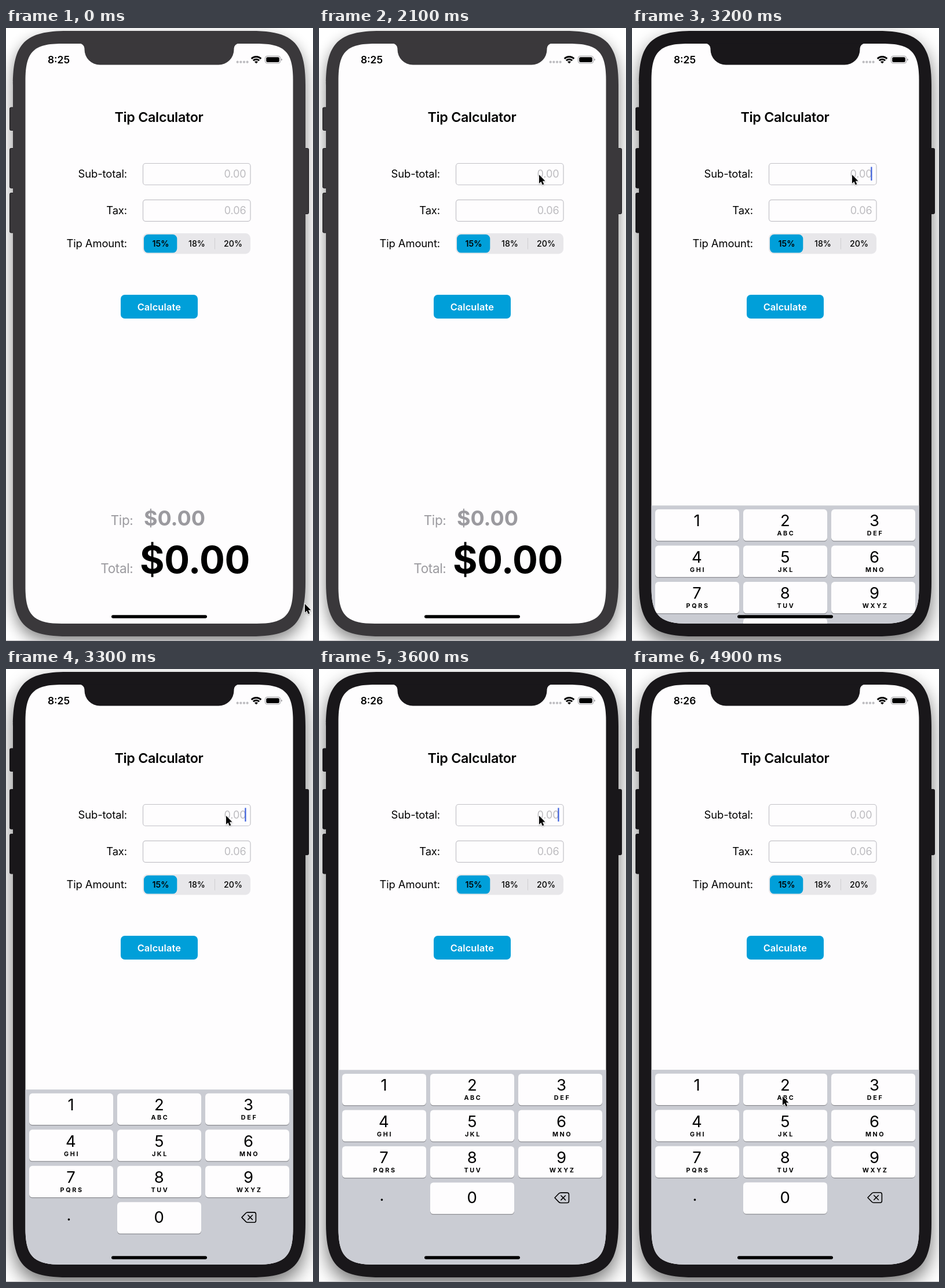
Recreate the animation shown at these times as an HTML page. Size 530 by 1057 pixels, loop 5000 ms.

```html
<!DOCTYPE html>
<html lang="en">
<head>
<meta charset="utf-8">
<title>Tip Calculator</title>
<style>
  html, body { margin: 0; width: 100%; height: 100%; overflow: hidden; background: #fff; }
  svg { display: block; width: 100vw; height: 100vh; font-family: Inter, "Open Sans", sans-serif; }
  text { white-space: pre; }
  .end { text-anchor: end; }
  .mid { text-anchor: middle; }
  .label { font-size: 18.4px; letter-spacing: -.1px; }
  .hint { font-size: 18px; letter-spacing: -.1px; fill: #bcbbbf; }
  .field { fill: #fefdfe; stroke: #c2c1c7; stroke-width: 1.2; }
  .seg { font-size: 14.2px; font-weight: 500; }
  .caption { font-size: 22.4px; letter-spacing: -.3px; fill: #9b9a9f; }
  .key { fill: #fefdfe; }
  .digit { font-size: 27.5px; }
  .letters { font-size: 10.8px; font-weight: 700; letter-spacing: 2.6px; }
</style>
</head>
<body>
<svg viewBox="0 0 530 1057">
  <defs>
    <clipPath id="screen"><path id="screenShape"/></clipPath>
    <clipPath id="fan"><path d="M432 61.3l-15-15h30z"/></clipPath>
  </defs>

  <path id="shadow"/>
  <path d="M0 1056.5H530" stroke="#b9b8bc"/>
  <g id="body">
    <g stroke="#19171a">
      <rect x="6.5" y="137" width="9" height="39.5" rx="2"/>
      <rect x="6.5" y="207.5" width="9" height="68.5" rx="2"/>
      <rect x="6.5" y="284.5" width="9" height="68.5" rx="2"/>
      <rect x="513.5" y="207.5" width="9" height="113" rx="2"/>
    </g>
    <path id="bodyShape"/>
  </g>

  <g clip-path="url(#screen)">
    <rect x="33" y="27" width="463" height="1000" fill="#fefdfe"/>

    <text class="mid" x="264" y="162" font-size="23.3" font-weight="600" letter-spacing="-.3">Tip Calculator</text>

    <text class="label end" x="209" y="258">Sub-total:</text>
    <rect class="field" x="236.5" y="233.5" width="185.5" height="37" rx="4.5"/>
    <text class="hint end" x="414.5" y="257.8">0.00</text>
    <rect id="caret" x="412.3" y="239.5" width="2.2" height="23.5" fill="#3f62dd"/>

    <text class="label end" x="209" y="321">Tax:</text>
    <rect class="field" x="236.5" y="296.3" width="185.5" height="37" rx="4.5"/>
    <text class="hint end" x="414.5" y="320.7">0.06</text>

    <text class="label end" x="209" y="377.5">Tip Amount:</text>
    <rect x="236" y="354" width="186" height="35.5" rx="8.5" fill="#e8e7ea"/>
    <rect x="238" y="356" width="57.3" height="31.6" rx="7.5" fill="#009fd9"/>
    <path d="M360.5 362V381.5" stroke="#cfced2"/>
    <text class="seg mid" x="267" y="377" style="font-weight:600">15%</text>
    <text class="seg mid" x="329.5" y="377">18%</text>
    <text class="seg mid" x="392" y="377">20%</text>

    <rect x="198" y="460" width="133" height="41" rx="7" fill="#009fd9"/>
    <text class="mid" x="264.3" y="486.7" font-size="16.4" font-weight="600" letter-spacing=".1" fill="#fefdfe">Calculate</text>

    <text class="caption end" x="219.5" y="857">Tip:</text>
    <text x="238" y="858" font-size="36" font-weight="700" letter-spacing="-.1" fill="#9b9a9f">$0.00</text>
    <text class="caption end" x="219.5" y="939.5">Total:</text>
    <text x="231" y="939.5" font-size="65" font-weight="700" letter-spacing="-.4">$0.00</text>

    <g id="keypad">
      <rect x="33" width="463" height="400" fill="#caccd3"/>
      <path d="M407 220.5l7-7.3q1.400-1.400 3.400-1.400h11q3 0 3 3v11.400q0 3-3 3h-11q-2 0-3.400-1.400zM417.800 216.700l7.600 7.600m0-7.600l-7.600 7.600"
            fill="none" stroke="#000" stroke-width="1.6" stroke-linejoin="round" stroke-linecap="round"/>
    </g>
    <rect x="182" y="1012.3" width="165" height="5.4" rx="2.7"/>
  </g>

  <path id="notch" d="M126.500 26.500a9 9 0 0 1 9 9V37a26.500 26.500 0 0 0 26.500 26.500H367a26.500 26.500 0 0 0 26.500-26.500V35.500a9 9 0 0 1 9-9z"/>

  <text id="clock" class="mid" x="91" y="61" font-size="17.4" font-weight="600"></text>
  <g fill="#bdbcc0">
    <circle cx="399.7" cy="58.7" r="2.1"/><circle cx="405.3" cy="58.7" r="2.1"/>
    <circle cx="411" cy="58.7" r="2.1"/><circle cx="416.6" cy="58.7" r="2.1"/>
  </g>
  <g clip-path="url(#fan)" fill="none" stroke="#000" stroke-width="2.9">
    <circle cx="432" cy="61.3" r="11.8"/>
    <circle cx="432" cy="61.3" r="7.3"/>
    <circle cx="432" cy="61.3" r="2" stroke-width="4"/>
  </g>
  <rect x="447.3" y="48.3" width="26.4" height="12.6" rx="3.8" fill="none" stroke="#9c9b9f"/>
  <rect x="449.2" y="50.2" width="22.6" height="8.8" rx="2.3"/>
  <path d="M475 52.600q1.800.7 1.800 2t-1.800 2z" fill="#9c9b9f"/>

  <g id="pointer">
    <path d="M0 0V14.900L3.400 11.800 5.800 17.400 8.300 16.300 5.900 10.800H10.400z" stroke="#fff" stroke-width="1.6"
          paint-order="stroke" style="filter:drop-shadow(0 1px 1px #0004)"/>
  </g>
</svg>
<script>
const LOOP = 5000, STEP = 100;
const KEYPAD_TOP = 691, SCREEN_BOTTOM = 1027, SPRING = 18.26;
const FOCUS_AT = 2800, KEYPAD_AT = 3088, BLINK_AT = 3650, MINUTE_AT = 3500;
const $ = id => document.getElementById(id);
const clamp = v => Math.max(0, Math.min(1, v));
const mix = (a, b, k) => a + (b - a) * k;

// Rectangle with continuous-curvature corners
function smoothRect(x, y, w, h, radius) {
  const e = radius * 1.4, c = e * .776, d = e - c;
  return `M${x + e} ${y}h${w - 2 * e}c${c} 0 ${e} ${d} ${e} ${e}` +
    `v${h - 2 * e}c0 ${c} ${-d} ${e} ${-e} ${e}` +
    `h${2 * e - w}c${-c} 0 ${-e} ${-d} ${-e} ${-e}` +
    `v${2 * e - h}c0 ${-c} ${d} ${-e} ${e} ${-e}z`;
}

const outline = smoothRect(12, 5, 505, 1044, 67);
$("shadow").setAttribute("d", outline);
$("bodyShape").setAttribute("d", outline);
$("screenShape").setAttribute("d", smoothRect(33.5, 27, 462, 1000, 45));

function add(tag, attributes, content = "") {
  const node = document.createElementNS("http://www.w3.org/2000/svg", tag);
  for (const name in attributes) node.setAttribute(name, attributes[name]);
  node.textContent = content;
  $("keypad").append(node);
}

function addKey(column, row, digit, letters) {
  const x = 40 + 152 * column, y = 6.7 + 62.5 * row;
  const center = [112, 264.3, 418.5][column];
  const box = { x, width: 145, height: 54.3, rx: 5.5 };
  add("rect", { ...box, y: y + 1.2, fill: "#8b8c91" });
  add("rect", { ...box, y, class: "key" });
  add("text", { class: "digit mid", x: center, y: y + (row == 3 ? 36 : 29.3) }, digit);
  add("text", { class: "letters mid", x: center + 1.6, y: y + 45.3 }, letters);
}

["", "ABC", "DEF", "GHI", "JKL", "MNO", "PQRS", "TUV", "WXYZ"]
  .forEach((letters, i) => addKey(i % 3, Math.floor(i / 3), i + 1, letters));
addKey(1, 3, 0, "");
add("text", { class: "digit mid", x: 108.5, y: 226 }, ".");

// Pointer stops: time, x, y
const stops = [
  [0, 516, 993], [299, 516, 993], [300, 423, 372], [500, 423, 372], [700, 380, 179],
  [800, 380, 179], [1300, 380, 253], [3800, 380, 253], [4500, 260, 737], [LOOP, 260, 737]
];

function pointerAt(t) {
  const i = stops.findIndex(stop => stop[0] > t);
  const [t0, x0, y0] = stops[i - 1], [t1, x1, y1] = stops[i];
  const k = (t - t0) / (t1 - t0), eased = k * k * (3 - 2 * k);
  return [mix(x0, x1, eased), mix(y0, y1, eased)];
}

// Critically damped spring: share of the slide still to go
function slideLeft(t) {
  const s = SPRING * Math.max(0, t - KEYPAD_AT) / 1000;
  return (1 + s) * Math.exp(-s);
}

function caretOpacity(t) {
  if (t < KEYPAD_AT) return 0;
  if (t < BLINK_AT) return 1;
  const phase = (t - BLINK_AT) % 1000;
  return phase < 370 ? clamp(1 - phase / 220) : clamp((phase - 370) / 200);
}

function draw(t) {
  const bezel = t >= FOCUS_AT ? "#19171a" : "#3a383b";
  const depth = clamp((t - FOCUS_AT) / 300);
  $("body").setAttribute("fill", bezel);
  $("notch").setAttribute("fill", bezel);
  $("shadow").style.cssText =
    `transform:translateY(${mix(11, 14, depth)}px);filter:blur(${mix(13, 16, depth)}px);opacity:${mix(.47, .55, depth)}`;
  $("clock").textContent = t < MINUTE_AT ? "8:25" : "8:26";
  $("caret").setAttribute("opacity", caretOpacity(t));
  $("keypad").setAttribute("transform", `translate(0 ${mix(KEYPAD_TOP, SCREEN_BOTTOM, slideLeft(t))})`);
  $("pointer").setAttribute("transform", `translate(${pointerAt(t)})`);
}

const start = performance.now();
function tick() {
  const t = (performance.now() - start) % LOOP;
  draw(Math.floor(t / STEP) * STEP);
  requestAnimationFrame(tick);
}
tick();
</script>
</body>
</html>
```
